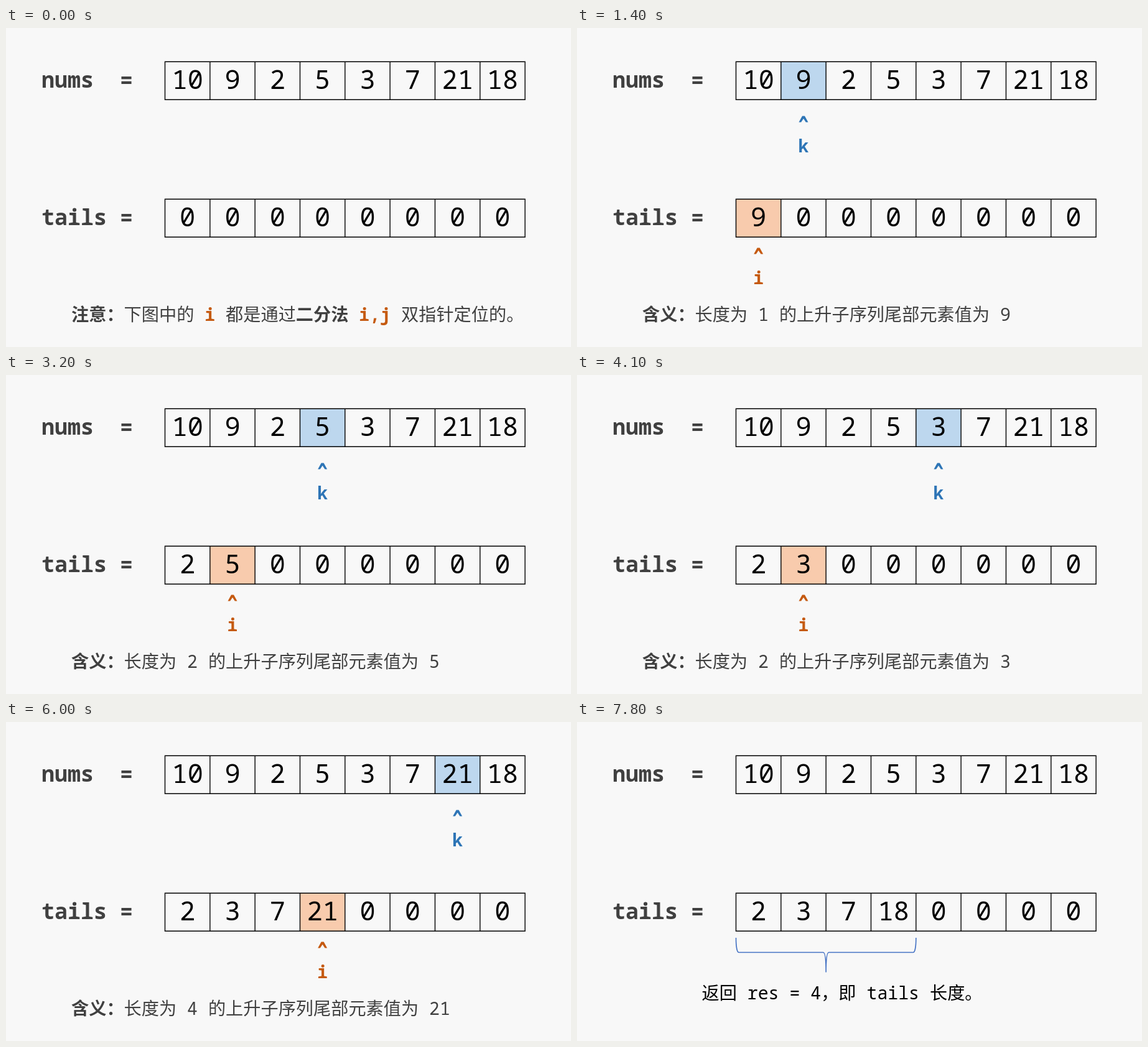
An HTML page that plays this animation: 908 px wide and 513 px high, repeating every 8 s.

```html
<!DOCTYPE html>
<html lang="zh-CN">
<head>
<meta charset="utf-8">
<style>
html, body { margin: 0; height: 100%; overflow: hidden; background: #f8f8f8; }
svg { display: block; width: 908px; height: 513px; }
text { font: 28.2px "Noto Sans Mono", "Noto Sans CJK SC", "Noto Sans CJK", monospace; white-space: pre; }
.cell { font-size: 42px; text-anchor: middle; }
.label { font-size: 35px; font-weight: 700; fill: #404040; }
.mark { font-weight: 700; text-anchor: middle; }
.note { fill: #404040; }
.b { font-weight: 700; }
.hot { font-weight: 700; fill: #c55a11; }
.grid { fill: none; stroke: #000; stroke-width: 1.4; }
.brace { fill: none; stroke: #4472c4; stroke-width: 1.6; }
</style>
</head>
<body>
<svg id="stage" viewBox="0 0 908 513"></svg>
<script>
const nums = [10, 9, 2, 5, 3, 7, 21, 18];
const times = [500, 1400, 2300, 3200, 4100, 5000, 6000, 6900, 7800];
const LOOP = 8000, LEFT = 255.5, CELL = 72.33, HEIGHT = 61;
const stage = document.getElementById('stage');
const cellX = i => LEFT + i * CELL;

const text = (x, y, cls, body) => `<text x="${x}" y="${y}" class="${cls}">${body}</text>`;

function row(y, label, values, active, color) {
  let out = text(57, y + 41.5, 'label', label);
  if (active >= 0)
    out += `<rect x="${cellX(active)}" y="${y}" width="${CELL}" height="${HEIGHT}" fill="${color}"/>`;
  let lines = `M${LEFT} ${y}H${cellX(8)}v${HEIGHT}H${LEFT}z`;
  values.forEach((v, i) => {
    if (i) lines += `M${cellX(i)} ${y}v${HEIGHT}`;
    out += text(cellX(i + 0.5), y + 44, 'cell', v);
  });
  return out + `<path class="grid" d="${lines}"/>`;
}

function pointer(i, y, name, color) {
  return `<g transform="translate(${cellX(i + 0.5)} ${y})" fill="${color}">
    <path d="M-7.5 10L-2 0H2L7.5 10H3.8L0 4.2L-3.8 10z"/>${text(0, 58.5, 'mark', name)}</g>`;
}

// Place nums[0..k] into tails, finding each slot by bisection.
function solve(k) {
  const tails = Array(8).fill(0);
  let size = 0, slot = -1;
  for (const n of nums.slice(0, k + 1)) {
    let i = 0, j = size;
    while (i < j) {
      const m = (i + j) >> 1;
      if (tails[m] < n) i = m + 1; else j = m;
    }
    tails[i] = n;
    slot = i;
    if (i === size) size++;
  }
  return { tails, slot, size };
}

const bold = s => `<tspan class="b">${s}</tspan>`;
const hot = s => `<tspan class="hot">${s}</tspan>`;

function draw(k) {
  const { tails, slot, size } = solve(k);
  const done = k === nums.length;
  const active = k >= 0 && !done;
  let out = row(54.2, 'nums  =', nums, active ? k : -1, '#bdd7ee') +
            row(275.2, 'tails =', tails, active ? slot : -1, '#f8cbad');
  if (active) {
    out += pointer(k, 141.5, 'k', '#2e75b6') + pointer(slot, 353.5, 'i', '#c55a11') +
      text(105, 471, 'note', `${bold('含义：')}长度为 ${slot + 1} 的上升子序列尾部元素值为 ${nums[k]}`);
  } else if (done) {
    const a = cellX(0), m = cellX(size / 2), b = cellX(size);
    out += `<path class="brace" d="M${a} 347C${a} 360 ${a + 1.5} 370.5 ${a + 4.5} 370.5H${m - 4.5}
      C${m - 1.5} 370.5 ${m} 382 ${m} 402.5C${m} 382 ${m + 1.5} 370.5 ${m + 4.5} 370.5
      H${b - 4.5}C${b - 1.5} 370.5 ${b} 360 ${b} 347"/>` +
      text(200.5, 445.5, '', `返回 res = ${size}，即 tails 长度。`);
  } else {
    out += text(105, 471, 'note',
      `${bold('注意：')}下图中的 ${hot('i')} 都是通过${bold('二分法')} ${hot('i,j')} 双指针定位的。`);
  }
  stage.innerHTML = out;
}

let shown;
function tick() {
  const t = performance.now() % LOOP;
  const k = times.filter(at => at <= t).length - 1;
  if (k !== shown) draw(shown = k);
  requestAnimationFrame(tick);
}
tick();
</script>
</body>
</html>
```
